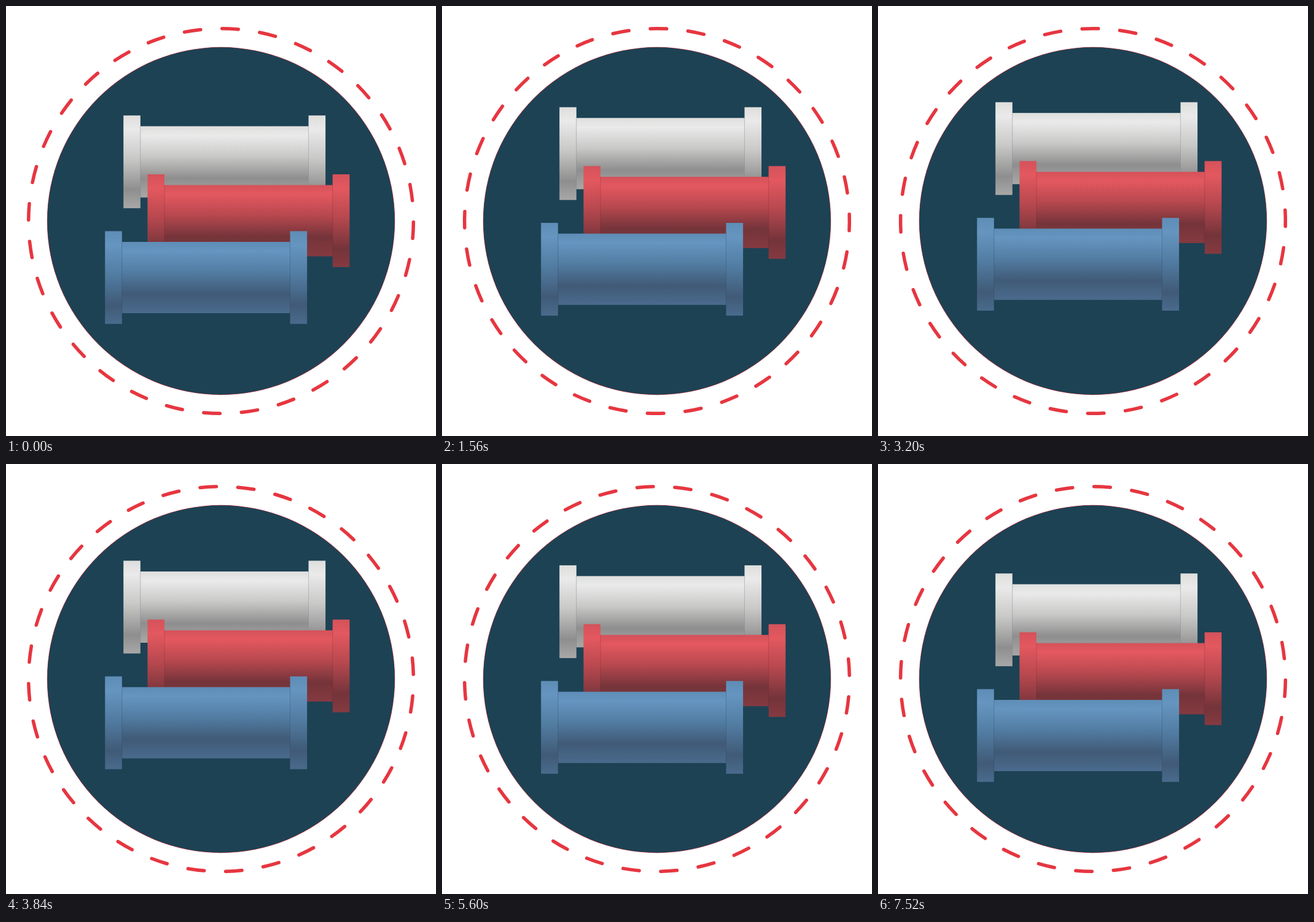
Recreate the animation shown at these times as an HTML page with a canvas. Size 700 by 700 pixels, loop 7.56 s.

```html
<!DOCTYPE html>
<html lang="en">
<head>
<meta charset="utf-8">
<title>Thread spools</title>
<style>
  html, body { margin: 0; width: 100%; height: 100%; overflow: hidden; background: #fff; }
  canvas { display: block; width: 700px; height: 700px; }
</style>
</head>
<body>
<canvas id="stage" width="700" height="700"></canvas>
<script>
const ctx = document.getElementById('stage').getContext('2d');

const STEP = 40, STEPS = 189;
const RED = '#e63640', NAVY = '#1d4254';
const CENTER = 350, DASHES = 32, RING = 313.3, HALF_DASH = 0.0423;
const START_ANGLE = 2.74, TURN = 0.5177;      // degrees, degrees per step
const RISE = 21.6, PEAK = 3200, LAND = 7820;  // pixels, ms

const SPOOLS = [
  { x: 191.2, y: 178.2, tones: ['#dededd', '#eaeaea', '#c9c9c8', '#8f8e8e', '#a9a8a8'], seam: 'rgba(120,140,155,.55)' },
  { x: 230.4, y: 274, tones: ['#d4525a', '#e4585f', '#b8484f', '#74343a', '#843a40'], seam: 'rgba(90,30,40,.3)' },
  { x: 161.2, y: 366.5, tones: ['#5e8db6', '#6595c0', '#527da3', '#405a77', '#4a6b8d'], seam: 'rgba(40,60,85,.35)' }
];

// Eased start, linear finish: control points (1/3, 0) and (5/6, 5/6)
function easeIn(x) {
  let lo = 0, hi = 1;
  for (let i = 0; i < 24; i++) {
    const s = (lo + hi) / 2;
    if (s + 0.5 * s * s - 0.5 * s * s * s < x) lo = s; else hi = s;
  }
  return 2.5 * lo * lo - 1.5 * lo * lo * lo;
}

function lift(t) {
  const away = t < PEAK ? (PEAK - t) / PEAK : (t - PEAK) / (LAND - PEAK);
  return RISE * (1 - easeIn(away));
}

function disc(radius, color) {
  ctx.fillStyle = color;
  ctx.beginPath();
  ctx.arc(CENTER, CENTER, radius, 0, Math.PI * 2);
  ctx.fill();
}

function ring(degrees) {
  ctx.strokeStyle = RED;
  ctx.lineWidth = 5.5;
  ctx.lineCap = 'round';
  for (let i = 0; i < DASHES; i++) {
    const a = (degrees - 90 + i * 360 / DASHES) * Math.PI / 180;
    ctx.beginPath();
    ctx.arc(CENTER, CENTER, RING, a - HALF_DASH, a + HALF_DASH);
    ctx.stroke();
  }
}

function shaded(x, y, w, h, tones, stops) {
  const g = ctx.createLinearGradient(0, y, 0, y + h);
  tones.forEach((tone, i) => g.addColorStop(stops[i], tone));
  ctx.fillStyle = g;
  ctx.fillRect(x, y, w, h);
}

function spool({ x, y, tones, seam }, up) {
  const top = y - up;
  shaded(x + 27, top + 17.5, 275, 116, tones, [0, 0.13, 0.42, 0.73, 1]);
  for (const dx of [0, 301.3]) {
    shaded(x + dx, top, 27.6, 151, tones, [0, 0.15, 0.46, 0.8, 1]);
  }
  ctx.fillStyle = seam;
  for (const dx of [27.2, 301]) ctx.fillRect(x + dx, top + 17.5, 0.8, 116);
}

function draw(now) {
  // The closing step repeats the opening pose.
  const n = Math.floor(now / STEP) % STEPS % (STEPS - 1);
  ctx.fillStyle = '#fff';
  ctx.fillRect(0, 0, 700, 700);
  ring(START_ANGLE + n * TURN);
  disc(283.2, RED);
  disc(282.7, NAVY);
  const up = lift(n * STEP);
  for (const s of SPOOLS) spool(s, up);
}

const begin = performance.now();
function tick() {
  draw(performance.now() - begin);
  requestAnimationFrame(tick);
}
tick();
</script>
</body>
</html>
```
